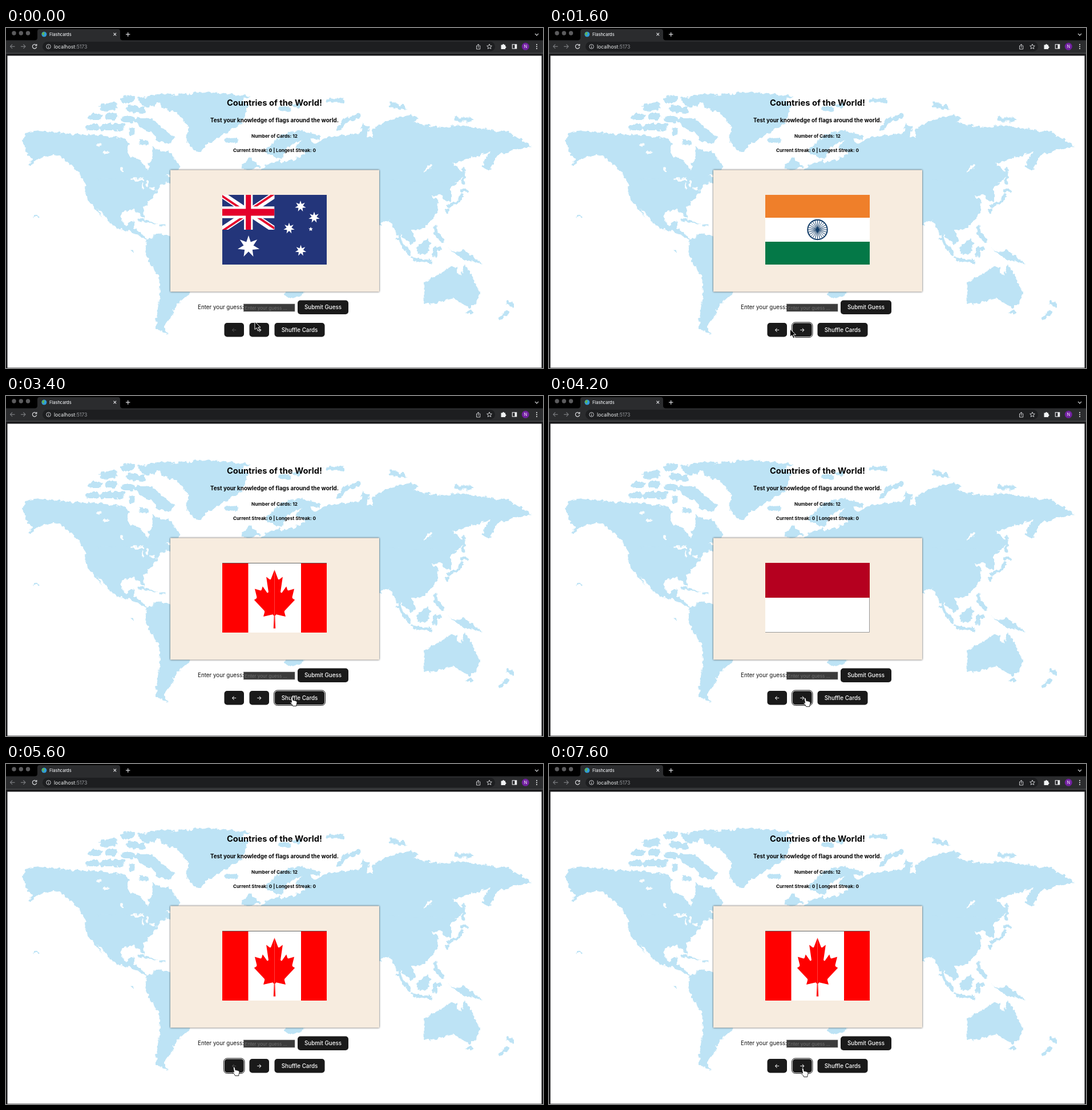
Animation of 941x595 px, one loop 8000 ms. Source, as an HTML page:

```html
<!DOCTYPE html>
<html lang="en">
<head>
<meta charset="utf-8">
<title>Flashcards</title>
<style>
  html, body { margin: 0; width: 100%; height: 100%; overflow: hidden; background: #000; }
  svg { display: block; }
  text { font-family: Inter, sans-serif; font-size: 9.8px; }
  .mid { text-anchor: middle; }
  .bold { font-weight: 700; }
  .small { font-size: 8.13px; }
  .icon { fill: none; stroke: #dcdde0; stroke-width: 1.2; }
  .dim { stroke: #77797c; }
  .land { fill: #bde3f5; }
  .isles { fill: none; stroke: #bde3f5; stroke-linecap: round; stroke-linejoin: round; }
  .button rect { fill: #1a1a1a; }
  .button text { fill: #fff; font-weight: 500; text-anchor: middle; }
  .button .ring { fill: none; stroke: #f2f2f2; stroke-width: .9; visibility: hidden; }
  .button .halo { fill: none; stroke: #1a1a1a; visibility: hidden; }
  .focus .ring, .focus .halo { visibility: visible; }
  .disabled text { fill: #555; }
  .flag { display: none; }
</style>
</head>
<body>
<svg width="941" height="595" viewBox="0 0 941 595">
  <defs>
    <filter id="coast" filterUnits="userSpaceOnUse" x="0" y="50" width="941" height="545" color-interpolation-filters="sRGB">
      <feTurbulence type="fractalNoise" baseFrequency=".14" numOctaves="2" seed="4"/>
      <feDisplacementMap in="SourceGraphic" scale="9" xChannelSelector="R" yChannelSelector="G"/>
    </filter>
    <clipPath id="pinwheel"><path d="M30 15h30v15zv15H0zH0V0zV0h30z"/></clipPath>
    <clipPath id="canton"><path d="M0 0H60V30H0z"/></clipPath>
    <path id="halfLeaf" d="M0 2030H-90L-45 1167-156 1069-1015 1220-899 900-919 827-1860 65-1648-34-1614-113-1800-685-1258-570-1185-608-1080-855-657-401-546-458-750-1510-423-1321-332-1348 0-2000z"/>
  </defs>

  <!-- browser window -->
  <path fill="#2b2c2e" d="M0 21.500H51Q55 21 55 17V6Q55 2 59 2H196Q200 2 200 6V17Q200 21 204 21.500H941V44H0z"/>
  <rect y="43.500" width="941" height="2" fill="#47484a"/>
  <rect y="45" width="941" height="550" fill="#19191b"/>
  <rect x="2.500" y="48.500" width="936" height="546" fill="#fff"/>
  <path stroke="#5c5c5e" stroke-width="7.400" stroke-linecap="round" d="M14 9h0M26.300 9h0M38.500 9h0"/>
  <circle cx="66.800" cy="11" r="4.500" fill="#2d9bdd"/>
  <path fill="#69b545" d="M63 9L66 7 68 9 66 11 67 14 64 12z"/>
  <text x="76" y="13.500" font-weight="500" style="font-size:7.400px" fill="#e8eaed">Flashcards</text>
  <rect x="64" y="24" width="793" height="17" rx="8.500" fill="#1d1e20"/>
  <text x="84" y="35.500" style="font-size:8.700px" fill="#f1f3f4">localhost<tspan fill="#96999d">:5173</tspan></text>
  <g class="icon">
    <path d="M188.500 8.700l4.600 4.600m0-4.600l-4.600 4.600M213.700 7.500v7.400M210 11.200h7.400M927 9.800l3 3 3-3"/>
    <path class="dim" d="M15.500 32.300h-8m3.600-3.600l-3.600 3.600 3.600 3.600M26 32.300h8m-3.600-3.600l3.600 3.600-3.600 3.600"/>
    <path d="M53 30A3.700 3.700 0 1 0 53.700 33.200M53.800 28v3h-3"/>
    <g stroke-width=".9">
      <circle cx="74.500" cy="32.500" r="3.800"/><path d="M74.500 32v3m0-5v.9"/>
      <path d="M826 31h-1.500v6h6.200v-6h-1.500m-1.600 3.500v-6m-1.800 1.700l1.800-1.800 1.800 1.800"/>
      <path id="bookmark"/>
    </g>
    <rect x="887.300" y="28.800" width="7.400" height="7.200"/>
  </g>
  <g fill="#f1f3f4">
    <path d="M867.500 29.500H870a1.500 1.500 0 0 1 3 0h2V32a1.500 1.500 0 0 1 0 3v2h-7.500z"/>
    <rect x="891.500" y="29" width="3.500" height="7"/>
    <circle cx="930" cy="29" r="1"/><circle cx="930" cy="32.500" r="1"/><circle cx="930" cy="36" r="1"/>
  </g>
  <circle cx="910.300" cy="32.300" r="6.500" fill="#7120a0"/>
  <text class="mid" x="910.300" y="34.900" style="font-size:7px" fill="#fff">N</text>

  <!-- world map: coarse outlines, roughened into coasts by the filter -->
  <g filter="url(#coast)">
    <path class="land" id="canada-alaska" d="M33 183L58 180 98 184 138 187 165 188 207 193 214 202 212 218 243 238 247 249 252 246 250 236 257 228 256 207 276 218 285 214 306 245 275 262 140 270 115 240 90 221 64 226 38 241 48 229 34 216 30 199z"/>
    <path class="land" id="usa-mexico" d="M138 265L275 260 292 258 292 270 270 273 258 296 240 315 243 334 224 319 203 322 202 336 209 345 224 337 224 350 232 354 248 371 220 358 189 347 160 315 168 332 151 310 141 297z"/>
    <path class="isles" id="arctic-isles" stroke-width="12" d="M146 174h12M170 173h32M150 156h12M180 154h10M208 160h12M170 139l18-2M216 141l22 3M208 126l12-2"/>
    <path class="land" id="ellesmere" d="M229 123L270 115 296 116 257 136 243 140z"/>
    <path class="land" id="baffin" d="M220 157L254 159 297 192 284 203 263 196 260 185 234 174z"/>
    <path class="land" id="greenland" d="M268 127L300 116 350 112 428 119 413 126 424 135 412 167 387 184 349 205 341 219 332 218 316 196 319 171 301 149 273 139z"/>
    <path class="isles" id="iceland-baffin-bay" stroke-width="9" d="M388 197h14M221 178v5M238 199l8 3"/>
    <path class="isles" id="caribbean" stroke-width="3" d="M232 335l16 3 14 4M268 345h12M50 329l9 4M219 389h2"/>
    <path class="land" id="south-america" d="M247 370L270 359 300 368 338 408 322 464 306 477 291 494 293 501 276 523 285 536 262 525 270 460 268 436 245 400z"/>
    <path class="land" id="europe" d="M430 290L440 250 463 237 474 235 480 229 482 236 511 228 526 218 507 208 518 196 493 208 484 229 463 223 452 216 483 187 517 179 548 188 551 195 533 193 539 204 562 191 625 183 640 300z"/>
    <path class="land" id="britain" d="M412 243L428 226 446 243 425 251z"/>
    <path class="land" id="siberia" d="M620 184L625 169 637 173 632 189 644 191 640 178 665 163 704 151 722 157 713 165 757 174 797 170 839 177 881 182 921 207 889 213 861 223 847 248 833 243 847 217 815 227 782 237 803 256 773 287 620 290z"/>
    <path class="land" id="south-asia" d="M560 260L780 270 780 304 767 302 763 291 744 295 757 301 756 323 735 349 710 354 718 371 710 379 690 360 698 383 684 359 671 336 640 350 590 350z"/>
    <path class="isles" id="polar-isles" stroke-width="7" d="M480 140l15 3M505 136h10M562 127h28M676 134l22 6M788 160h28M583 177l10-14 25-10"/>
    <path class="isles" id="japan-philippines" stroke-width="6" d="M803 246l-2 26M800 284h6M799 293l-5 9-18 10M773 318v3M751 348l3 11 10 13"/>
    <path class="isles" id="sunda" stroke-width="6" d="M687 368l21 28M714 404l28 5M752 384v14m0-12h8"/>
    <path class="land" id="borneo" d="M719 384L738 369 746 376 735 398 723 396z"/>
    <path class="land" id="new-guinea" d="M775 386L790 393 802 388 836 413 802 405z"/>
    <path class="land" id="oz" d="M731 446L757 433 779 417 790 419 788 428 798 433 804 414 818 438 831 463 823 482 812 490 784 473 743 484 733 482z"/>
    <path class="isles" id="tasman" stroke-width="6" d="M809 497h5M879 478l8 9M880 496l-14 12"/>
    <path class="land" id="africa" d="M485 460H525L514 470 495 474z"/>
    <path class="isles" id="lakes" style="stroke:#fff" stroke-width="3.500" d="M221 265h18M239 272v8M248 269v7M252 281h8M160 205h6M172 217h8M203 244v7M734 251l10-10"/>
  </g>

  <!-- page -->
  <g class="mid bold" fill="#050505">
    <text x="470.500" y="136" style="font-size:14.700px">Countries of the World!</text>
    <text x="470.500" y="165">Test your knowledge of flags around the world.</text>
    <text x="470.500" y="191.500" class="small">Number of Cards: 12</text>
    <text x="470.500" y="217" class="small">Current Streak: 0 | Longest Streak: 0</text>
  </g>
  <rect x="288" y="248.500" width="366" height="213" fill="#f7ecdf" style="filter:drop-shadow(0 0 1.800px #000b)"/>
  <text x="336" y="492.300" fill="#111">Enter your guess:</text>
  <rect x="416.500" y="483" width="89.500" height="13" fill="#3b3b3b" stroke="#6b6b6b" stroke-width=".6"/>
  <text x="418.500" y="492.500" class="small" fill="#6f6f6f">Enter your guess ...</text>
  <g id="buttons"></g>

  <!-- flags, on a 183 x 122 field -->
  <g transform="translate(379 292)">
    <g class="flag" id="australia">
      <rect width="183" height="122" fill="#23357a"/>
      <g transform="scale(1.525 2.033)" clip-path="url(#canton)">
        <path d="M0 0L60 30M60 0L0 30" stroke="#fff" stroke-width="6"/>
        <path d="M0 0L60 30M60 0L0 30" stroke="#e4002b" stroke-width="4" clip-path="url(#pinwheel)"/>
        <path d="M30 0V30M0 15H60" stroke="#fff" stroke-width="10"/>
        <path d="M30 0V30M0 15H60" stroke="#e4002b" stroke-width="6"/>
      </g>
      <path id="stars" fill="#fff"/>
    </g>
    <g class="flag" id="india">
      <rect width="183" height="122" fill="#fff"/>
      <rect width="183" height="40" fill="#ef7f2a"/>
      <rect y="82" width="183" height="40" fill="#047847"/>
      <g fill="none" stroke="#123d68">
        <circle cx="91.500" cy="61" r="17.200" stroke-width="2"/>
        <path id="spokes"/>
        <circle cx="91.500" cy="61" r="2.500" fill="#123d68"/>
      </g>
    </g>
    <g class="flag" id="japan">
      <rect x="1" y="1" width="181" height="120" fill="#fff" stroke="#7b858a"/>
      <circle cx="90.500" cy="60.500" r="39" fill="#b5001f"/>
    </g>
    <g class="flag" id="indonesia">
      <rect width="183" height="122" fill="#fff"/>
      <path fill="none" stroke="#989898" d="M182.500 61V121.500H0"/>
      <rect width="183" height="61" fill="#b5001f"/>
    </g>
    <g class="flag" id="canada">
      <rect width="183" height="122" fill="#f00"/>
      <rect x="45.500" width="92.500" height="122" fill="#fff"/>
      <g fill="#f00" transform="translate(91.500 63) scale(.0192 .0255)">
        <use href="#halfLeaf"/><use href="#halfLeaf" transform="scale(-1 1)"/>
      </g>
      <rect width="183" height=".9" fill="#555"/>
    </g>
  </g>

  <g id="cursor">
    <path id="arrow" fill="#000" stroke="#fff" d="M0 0V13.500L3.200 10.600 5.500 16 7.900 15 5.600 9.800H10z"/>
    <path id="hand" fill="#fff" stroke="#111" stroke-width=".9" d="M-1.700 .8C-2-1 .5-1.400 1 .5L2.200 5Q4 4 4.800 5.200 6.500 4.800 7.200 6 9 5.800 9 7.700 9 10 7.800 12.700V14.600H1.600Q1 12-2.800 8.800-2.500 6.500-.4 8.300z"/>
  </g>
</svg>
<script>
const LOOP = 8000, STEP = 200;
const byId = id => document.getElementById(id);

const BUTTONS = {
  submit:  { x: 511, y: 476.5, w: 89, label: 'Submit Guess' },
  prev:    { x: 382.5, y: 516, w: 34.5, label: '←' },
  next:    { x: 426.5, y: 516, w: 34.5, label: '→' },
  shuffle: { x: 470.5, y: 516, w: 88, label: 'Shuffle Cards' }
};
const HEIGHT = 24.5;

byId('buttons').innerHTML = Object.entries(BUTTONS).map(([id, { x, y, w, label }]) => {
  const rect = (grow, cls) =>
    `<rect class="${cls}" x="${x - grow}" y="${y - grow}" width="${w + 2 * grow}" height="${HEIGHT + 2 * grow}" rx="${5 + grow}"/>`;
  return `<g class="button" id="${id}">${rect(0, '')}${rect(0, 'ring')}${rect(1, 'halo')}
    <text x="${x + w / 2}" y="${y + 15.8}">${label}</text></g>`;
}).join('');

function star(cx, cy, radius, points = 7, inner = .45) {
  const corners = Array.from({ length: points * 2 }, (_, i) => {
    const angle = i * Math.PI / points, r = i % 2 ? radius * inner : radius;
    return `${cx + r * Math.sin(angle)} ${cy - r * Math.cos(angle)}`;
  });
  return `M${corners.join('L')}z`;
}
byId('bookmark').setAttribute('d', star(847, 32.7, 4.6, 5, .45));
byId('stars').setAttribute('d',
  star(46, 90.5, 19.5) + star(137, 20, 10) + star(161, 39.5, 10) +
  star(117, 58.5, 10) + star(137.5, 97.5, 10) + star(155, 60, 4, 5));

byId('spokes').setAttribute('d', Array.from({ length: 24 }, (_, i) => {
  const angle = i * Math.PI / 12;
  return `M91.5 61l${17 * Math.cos(angle)} ${17 * Math.sin(angle)}`;
}).join(''));

// [time, flag, focused button, back button disabled]
const STATES = [
  [0, 'australia', '', true],
  [400, 'japan', 'next'],
  [1000, 'india', 'next'],
  [1800, 'japan', 'prev'],
  [3000, 'canada', 'shuffle'],
  [4200, 'indonesia', 'next'],
  [5200, 'canada', 'prev', true],
  [6400, 'japan', 'shuffle', true],
  [7000, 'indonesia', 'next'],
  [7400, 'india', 'next'],
  [7600, 'canada', 'next']
];

// pointer moves: when they begin and end, and where the tip arrives
const MOVES = [
  { from: 0, to: 200, x: 442, y: 527 },
  { from: 1400, to: 1800, x: 403, y: 527 },
  { from: 2400, to: 3000, x: 501, y: 528 },
  { from: 3600, to: 4200, x: 449, y: 529 },
  { from: 4800, to: 5200, x: 400, y: 531 },
  { from: 5800, to: 6400, x: 500, y: 530 },
  { from: 6600, to: 7000, x: 445, y: 533 }
];

function pointerAt(t) {
  let x = 436, y = 514;
  for (const move of MOVES) {
    const k = Math.min(1, Math.max(0, (t - move.from) / (move.to - move.from)));
    const ease = k * k * (3 - 2 * k);
    x += (move.x - x) * ease;
    y += (move.y - y) * ease;
  }
  return [x, y];
}

function draw(t) {
  const [, flag, focus, disabled] = STATES.filter(s => s[0] <= t).pop();
  document.querySelectorAll('.flag').forEach(el => el.style.display = el.id === flag ? 'inline' : 'none');
  for (const id in BUTTONS) byId(id).classList.toggle('focus', id === focus);
  byId('prev').classList.toggle('disabled', !!disabled);

  const [x, y] = pointerAt(t);
  const over = t > 0 && Object.values(BUTTONS).some(b => x > b.x && x < b.x + b.w && y > b.y && y < b.y + HEIGHT);
  byId('cursor').setAttribute('transform', `translate(${x} ${y})`);
  byId('hand').style.display = over ? 'inline' : 'none';
  byId('arrow').style.display = over ? 'none' : 'inline';
}

const start = performance.now();
function tick() {
  const t = (performance.now() - start) % LOOP;
  draw(Math.floor(t / STEP) * STEP);
  requestAnimationFrame(tick);
}
tick();
</script>
</body>
</html>
```
